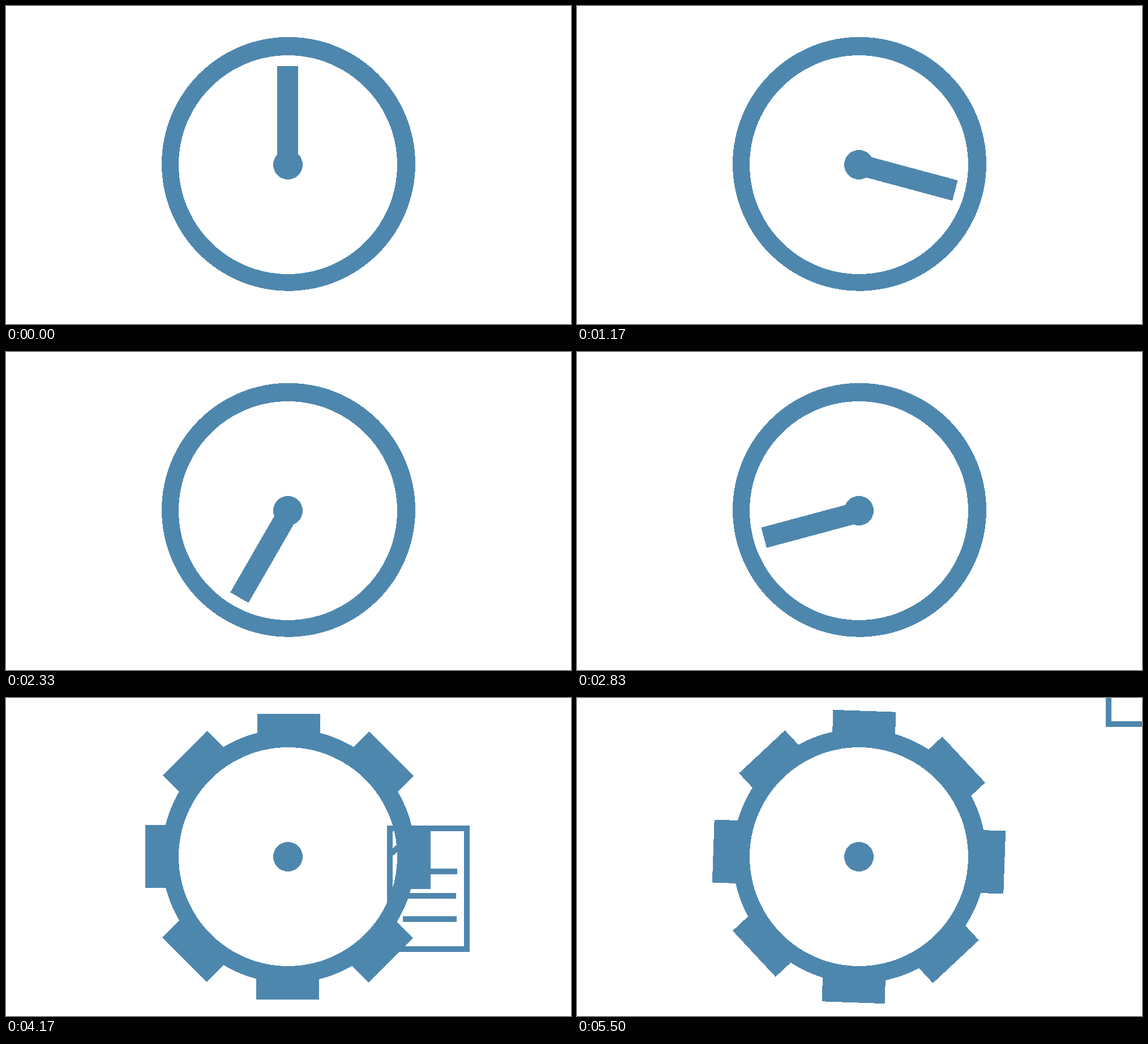
Recreate the animation shown at these times as an HTML page. Size 998 px wide and 561 px high, loop 5.67 s.

```html
<!DOCTYPE html>
<html lang="en">
<head>
<meta charset="utf-8">
<title>Clock to gear</title>
<style>
  html, body { margin: 0; width: 100%; height: 100%; overflow: hidden; background: #fff; }
  svg { display: block; width: 100%; height: 100%; shape-rendering: crispEdges; fill: #4e87ae; }
  #page path { fill: none; stroke: #4e87ae; stroke-width: 10; }
</style>
</head>
<body>
<svg viewBox="0 0 998 561">
  <circle cx="499" cy="278.7" r="224"/>
  <g id="gear"></g>
  <circle cx="498" cy="280" r="193" fill="#fff"/>
  <circle cx="498" cy="280" r="26"/>
  <rect id="hand" x="-19.6" y="-174.8" width="37" height="174.8"/>
  <g id="page">
    <path d="M4.5 4.7H141V218H4.5Z"/>
    <path d="M4.5 52L57.5 4.5"/>
    <path d="M28.5 80.8H124M28 123.7H122M28 165.2H123"/>
  </g>
</svg>
<script>
const LOOP = 5670, STEP = 1000 / 6, STEPS = 34, GEAR_START = 25;
const [gear, hand, page] = ['gear', 'hand', 'page'].map(id => document.getElementById(id));

const move = (el, x, y, angle = 0) =>
  el.setAttribute('transform', `translate(${x} ${y}) rotate(${angle})`);
const show = (el, on) => { el.style.display = on ? '' : 'none'; };

// Diagonal teeth reach a little further than the upright ones
function addTooth(i) {
  const tooth = document.createElementNS(gear.namespaceURI, 'rect');
  const reach = i % 2 ? 257.4 : 252.2;
  const attrs = { x: -54.5, y: -reach, width: 111, height: reach - 205,
                  transform: `rotate(${i * 45})` };
  for (const key in attrs) tooth.setAttribute(key, attrs[key]);
  gear.append(tooth);
}
for (let i = 0; i < 8; i++) addTooth(i);

function draw(step) {
  const n = step - GEAR_START, geared = n >= 0;
  show(gear, geared);
  show(page, geared);
  show(hand, !geared);
  if (geared) {
    // Six degrees a step at first, then five
    move(gear, 498, 280, -5 * n - Math.min(n, 3));
    // The page speeds up along a curve towards the upper right
    move(page, 673 + 2.43 * n ** 2.25, 225 - 17.2 * n ** 1.51);
  } else {
    move(hand, 498.7, 281.3, step * 15);
  }
}

const start = performance.now();
function tick() {
  const t = (performance.now() - start) % LOOP;
  // Steps change on times rounded to 10 ms
  draw(Math.min(STEPS - 1, Math.floor((t + 3.4) / STEP)));
  requestAnimationFrame(tick);
}
tick();
</script>
</body>
</html>
```
